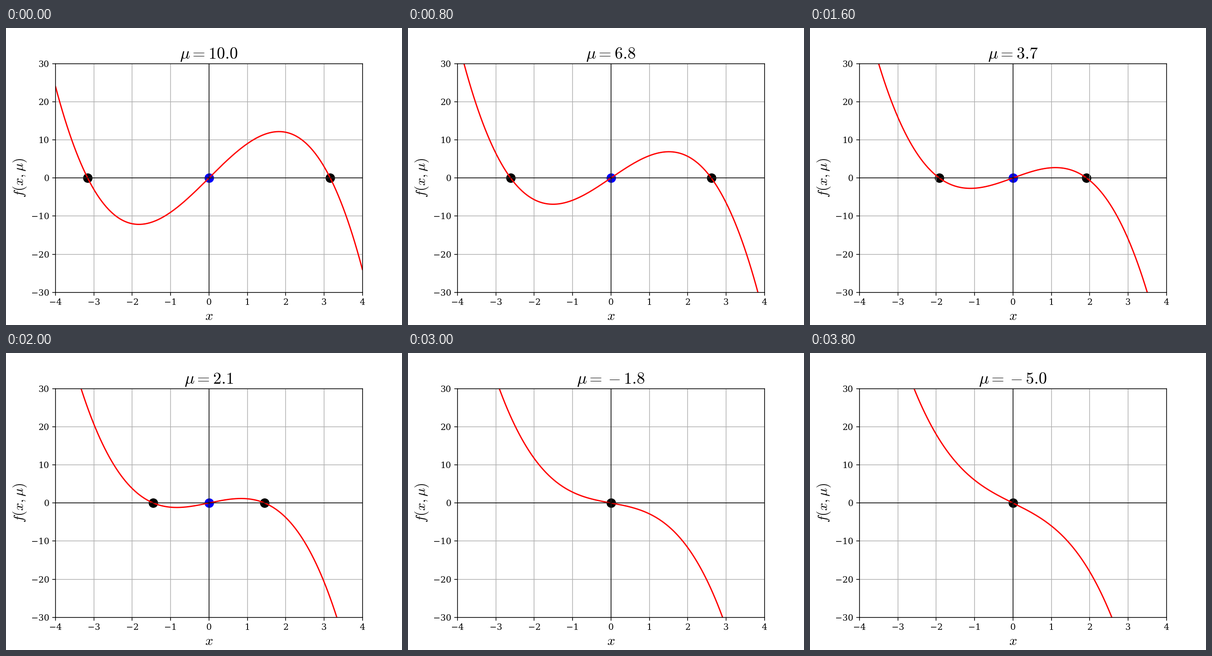
A matplotlib script for the animation above (4000 ms loop, 864 by 648 pixels).

```python
import numpy as np
import matplotlib.pyplot as plt
from matplotlib.animation import FuncAnimation

FRAMES = 20
INTERVAL = 200

plt.rcParams.update({
    "font.family": "DejaVu Serif",
    "mathtext.fontset": "cm",
    "font.size": 16,
    "axes.titlesize": 19.2,
    "axes.labelsize": 16,
    "xtick.labelsize": 10,
    "ytick.labelsize": 10,
})

mus = np.linspace(10, -5, FRAMES)
x = np.linspace(-4, 4, 400)

fig, ax = plt.subplots(figsize=(6.4, 4.8), dpi=135)
ax.set(xlim=(-4, 4), ylim=(-30, 30), xlabel="$x$", ylabel=r"$f(x, \mu)$")
ax.grid(True)

curve, = ax.plot([], [], color="red", lw=1.5)
ax.axhline(0, color="black", lw=0.8)
ax.axvline(0, color="black", lw=0.8)
stable = ax.scatter([], [], s=100, color="black")
unstable = ax.scatter([], [], s=100, color="blue")


def on_axis(roots):
    """Place fixed points on the line f = 0."""
    return np.column_stack([roots, np.zeros(len(roots))])


def title(mu):
    # The empty group keeps binary spacing around the minus sign.
    sign = "{}-" if mu < 0 else ""
    return rf"$\mu = {sign}{abs(mu):.1f}$"


def update(i):
    mu = mus[i]
    curve.set_data(x, mu * x - x**3)
    if mu > 0:
        root = np.sqrt(mu)
        stable.set_offsets(on_axis([-root, root]))
        unstable.set_offsets(on_axis([0]))
    else:
        stable.set_offsets(on_axis([0]))
        unstable.set_offsets(np.empty((0, 2)))
    ax.set_title(title(mu))
    return curve, stable, unstable


anim = FuncAnimation(fig, update, frames=FRAMES, interval=INTERVAL,
                     repeat=True, repeat_delay=0, blit=False)
plt.show()
```
